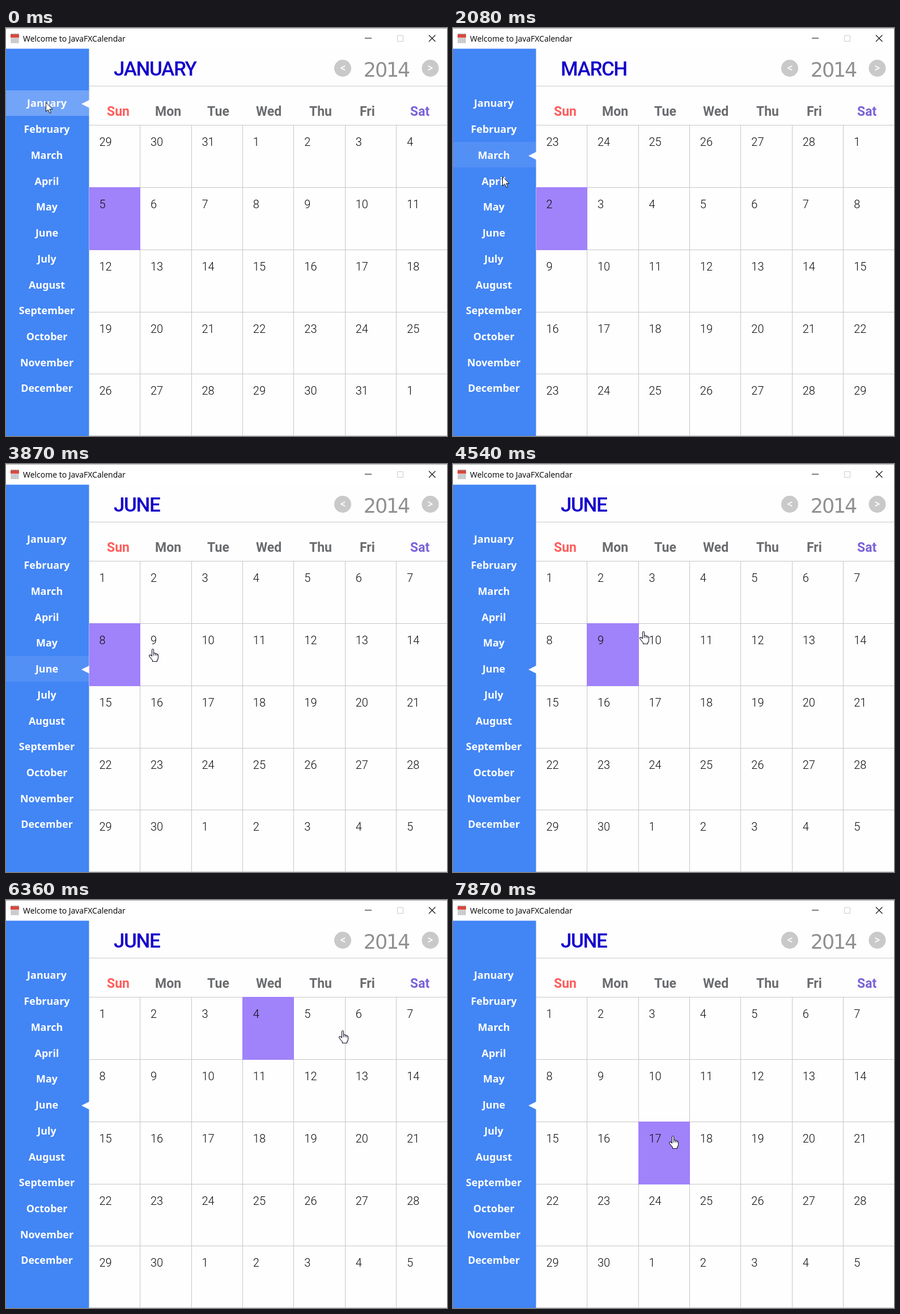
Animation of 778x720 px, one loop 8000 ms. Source, as an HTML page with a canvas:

```html
<!DOCTYPE html>
<html lang="en">
<head>
<meta charset="utf-8">
<title>Calendar</title>
<style>
html, body { margin: 0; width: 100%; height: 100%; overflow: hidden; background: #fff; }
canvas { display: block; width: 778px; height: 720px; }
</style>
</head>
<body>
<canvas id="stage" width="778" height="720"></canvas>
<script>
const ctx = document.getElementById('stage').getContext('2d');
const LOOP = 8000, STEP = 139, LAG = 250, FIRST_CELL_CLICK = 4390;
const MONTHS = ['January', 'February', 'March', 'April', 'May', 'June', 'July',
  'August', 'September', 'October', 'November', 'December'];
const WEEKDAYS = { Sun: 178, Mon: 263, Tue: 355, Wed: 441, Thu: 535, Fri: 624, Sat: 713 };
const MONTH_CLICKS = [-100, 1100, 1660, 2210, 2860, 3430];

// Pointer moves: start, end, x, y, bend of the way there
const MOVES = [
  [0, 0, 70, 131, 1],
  [120, 820, 82, 212, 1],
  [1100, 2080, 87, 262, 1],
  [2210, 3150, 77, 338, 1],
  [3300, 4260, 291, 303, 2],
  [4390, 4840, 345, 242, 3],
  [5110, 5350, 267, 223, 1],
  [5630, 6360, 587, 230, 1],
  [6640, 7570, 388, 417, 0.6],
  [7720, 7870, 381, 416, 1],
];

const colX = c => Math.floor(146.5 + 90.3 * c);
const rowY = r => Math.min(719, Math.floor(171.75 + 109.75 * r));
const moveAt = t => MOVES.findLastIndex(m => m[0] <= t + 0.01);

// The screen refreshes in steps while the pointer moves and rests in between
function snap(t) {
  const [start, end] = MOVES[moveAt(t)];
  if (t >= end) return end;
  const step = (end - start) / Math.round((end - start) / STEP);
  return start + Math.floor((t - start) / step + 0.001) * step;
}

function pointerAt(t) {
  const i = moveAt(t);
  const [start, end, x, y, bend] = MOVES[i];
  if (t >= end) return [x, y];
  const [, , x0, y0] = MOVES[i - 1];
  const left = (end - t) / (end - start);
  return [x + (x0 - x) * left ** bend, y + (y0 - y) * left ** (1 / bend)].map(Math.round);
}

// Cells are selected shortly after the pointer has reached them
function selectedCell(t) {
  if (t < FIRST_CELL_CLICK) return [1, 0];
  const [x, y] = pointerAt(t - LAG);
  return [Math.floor((y - 171) / 110), Math.floor((x + 7 - 146.5) / 90.3)];
}

function rect(x, y, w, h, color) {
  ctx.fillStyle = color;
  ctx.fillRect(x, y, w, h);
}

function text(str, x, y, font, color, align = 'left', spacing = 0) {
  ctx.font = font + ', sans-serif';
  ctx.fillStyle = color;
  ctx.textAlign = align;
  ctx.letterSpacing = spacing + 'px';
  ctx.fillText(str, x, y);
}

function disc(x, y, r, color) {
  ctx.fillStyle = color;
  ctx.beginPath();
  ctx.arc(x, y, r, 0, Math.PI * 2);
  ctx.fill();
}

function shape(d, x, y, fill, stroke, width = 1) {
  const path = new Path2D(d);
  ctx.save();
  ctx.translate(x, y);
  if (fill) {
    ctx.fillStyle = fill;
    ctx.fill(path);
  }
  if (stroke) {
    ctx.strokeStyle = stroke;
    ctx.lineWidth = width;
    ctx.lineJoin = 'round';
    ctx.stroke(path);
  }
  ctx.restore();
}

function drawTitleBar() {
  rect(0, 0, 778, 37, '#fff');
  rect(0, 0, 778, 1, '#a6a6a6');
  rect(8, 12, 15, 15, '#d8dadd');
  rect(8, 11, 15, 6, '#e0483e');
  for (let i = 0; i < 4; i++) {
    rect(10 + i * 3.4, 9.5, 1.3, 4, '#8d5a58');
    for (let j = 0; j < 3; j++) rect(9.5 + i * 3.3, 18.5 + j * 2.7, 2, 1.5, '#a9b0b6');
  }
  text('Welcome to JavaFXCalendar', 30, 24, '14px "Open Sans"', '#000');
  rect(633, 17.5, 12, 1, '#000');
  shape('M.5 .5h10v10h-10z', 690, 13, null, '#cbcbcb');
  shape('M0 0L11.5 11.5M11.5 0L0 11.5', 746, 12.5, null, '#111', 1.1);
}

function drawSidebar(t, month) {
  rect(0, 36.5, 146.5, 684, '#4285f5');
  MONTH_CLICKS.forEach((at, m) => {
    const glow = 0.3 * (1 - (t - at) / 600);
    if (t >= at && glow > 0) {
      rect(0, Math.round(110 + 45.73 * m), 146.5, 45, `rgba(255,255,255,${glow})`);
    }
  });
  MONTHS.forEach((name, i) => text(name, 72, Math.round(139.4 + 45.73 * i),
    '700 18px "Noto Sans"', '#fff', 'center'));
  shape('M0 0L14 -7V7Z', 133, 134 + 45.75 * month, '#fff');
}

function drawHeader(month) {
  text(MONTHS[month].toUpperCase(), 190, 84, '500 35px Roboto', '#1400cb', 'left', -1.4);
  for (const [x, mark] of [[594, '<'], [748.5, '>']]) {
    disc(x, 71, 15, '#c9c9c9');
    text(mark, x, 77, '700 17px "Noto Sans"', '#fff', 'center');
  }
  text('2014', 671, 85.5, '35px "DejaVu Sans"', '#909090', 'center', -2.2);
  rect(147, 102, 631, 1, '#c8c8c8');
  const colors = { Sun: '#ff5c5c', Sat: '#7a62d8' };
  for (const [name, x] of Object.entries(WEEKDAYS)) {
    text(name, x, 154.5, '600 23px Roboto', colors[name] || '#696b6e');
  }
}

function drawGrid(month, [row, col]) {
  for (let r = 0; r < 6; r++) rect(147, rowY(r), 631, 1, '#c6c6c6');
  for (let c = 1; c < 7; c++) rect(colX(c), 171, 1, 549, '#c6c6c6');
  const left = Math.max(147, colX(col)), top = rowY(row);
  rect(left, top, colX(col + 1) + 1 - left, rowY(row + 1) + 1 - top, '#a082fa');
  const offset = new Date(2014, month, 1).getDay();
  for (let i = 0; i < 35; i++) {
    const day = new Date(2014, month, 1 + i - offset).getDate();
    text(day, 164.5 + 90.45 * (i % 7), rowY(Math.floor(i / 7)) + 37,
      '300 20px Roboto', '#0c0c0c');
  }
}

function drawPointer([x, y]) {
  if (x < 147) {
    shape('M0 0V16L3.8 12.6L6.5 18.8L9 17.8L6.4 11.8H11.6Z', x + 0.5, y + 0.5, '#fff', '#111');
    return;
  }
  shape('M5.5 13V2.5Q5.5 .5 7 .5T8.5 2.5V8Q11 6.7 11.4 8.8Q13.8 7.8 14.2 9.8' +
    'Q16.5 9.2 16.5 11.5V16Q16.5 18.5 14.5 20.5V22.5H6.5V20.5Q4 17.5 1 13.5' +
    'Q0 11.8 1.5 11Q3 10.4 5.5 13Z', x, y, '#fff', '#15152a', 1.1);
  shape('M8.5 8V12M11.4 9V12M14.2 10V12.5', x, y, null, '#15152a');
}

function draw(now) {
  const t = snap(now % LOOP);
  const month = MONTH_CLICKS.findLastIndex(at => at <= t);
  rect(0, 0, 778, 720, '#fefefe');
  drawTitleBar();
  drawSidebar(t, month);
  drawHeader(month);
  drawGrid(month, selectedCell(t));
  drawPointer(pointerAt(t));
}

let begin;
function tick(now) {
  begin ??= now;
  draw(now - begin);
  requestAnimationFrame(tick);
}
requestAnimationFrame(tick);
</script>
</body>
</html>
```
